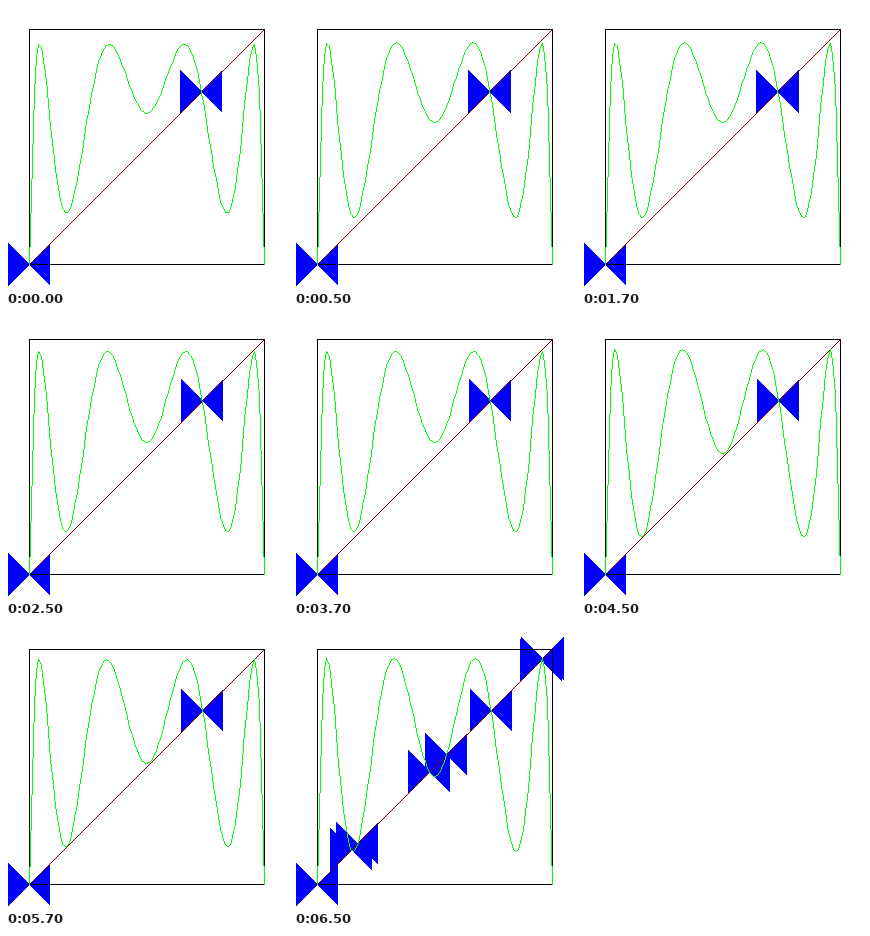
Animation, 282 px wide and 282 px high, one loop 8000 ms. Source, as a matplotlib script:

```python
"""Third iterate of the logistic map, with its fixed points marked on the diagonal."""
import numpy as np
import matplotlib.pyplot as plt
from matplotlib.animation import FuncAnimation

SIZE, DPI = 282, 64
LEFT, BOTTOM, SPAN = 22.72, 258, 235
HALF = 21.05              # half width of a bow-tie marker
STEP_MS, FRAMES = 500, 16
WHITE, BLACK, BLUE = (255, 255, 255), (0, 0, 0), (0, 0, 255)
GREEN, MAROON = (0, 255, 0), (128, 0, 0)

rows, cols = np.mgrid[:SIZE, :SIZE]
# wide steps at the steep ends, fine steps between
xs = np.r_[0, np.linspace(0.021, 0.979, 95), 1]


def third_iterate(r, x):
    for _ in range(3):
        x = r * x * (1 - x)
    return x


def fixed_points(r):
    x = np.linspace(1e-4, 1, 8001)
    gap = third_iterate(r, x) - x
    i = np.flatnonzero(gap[:-1] * gap[1:] < 0)
    roots = x[i] - gap[i] * (x[i + 1] - x[i]) / (gap[i + 1] - gap[i])
    return [0.0, *roots]


def to_stage(x, y):
    return LEFT + SPAN * np.asarray(x), BOTTOM - SPAN * np.asarray(y)


def nearest(v):
    return np.floor(np.asarray(v) + 0.5).astype(int)


def draw_line(canvas, x, y, color):
    """One-pixel polyline without antialiasing."""
    points = nearest(np.transpose(to_stage(x, y)))
    for p, q in zip(points[:-1], points[1:]):
        px, py = nearest(np.linspace(p, q, abs(q - p).max() + 1)).T
        canvas[py, px] = color


def draw_bow_tie(canvas, p):
    x, y = to_stage(p, p)
    inside = abs(rows - np.floor(y)) <= abs(cols - nearest(x))
    inside &= (cols >= nearest(x - HALF)) & (cols < nearest(x + HALF))
    canvas[inside] = BLUE


def render(r):
    canvas = np.full((SIZE, SIZE, 3), WHITE, dtype=np.uint8)
    for p in fixed_points(r):
        draw_bow_tie(canvas, p)
    draw_line(canvas, [0, 1], [0, 1], MAROON)
    draw_line(canvas, [0, 1, 1, 0, 0], [0, 0, 1, 1, 0], BLACK)
    draw_line(canvas, xs, third_iterate(r, xs), GREEN)
    return canvas


fig = plt.figure(figsize=(SIZE / DPI, SIZE / DPI), dpi=DPI, facecolor="white")
stage = fig.figimage(render(3.75), origin="upper")


def draw(frame):
    stage.set_data(render(3.75 + 0.025 * ((frame + 3) // 4)))
    return [stage]


anim = FuncAnimation(fig, draw, frames=FRAMES, interval=STEP_MS,
                     init_func=lambda: draw(0), repeat=True, repeat_delay=0)
plt.show()
```
